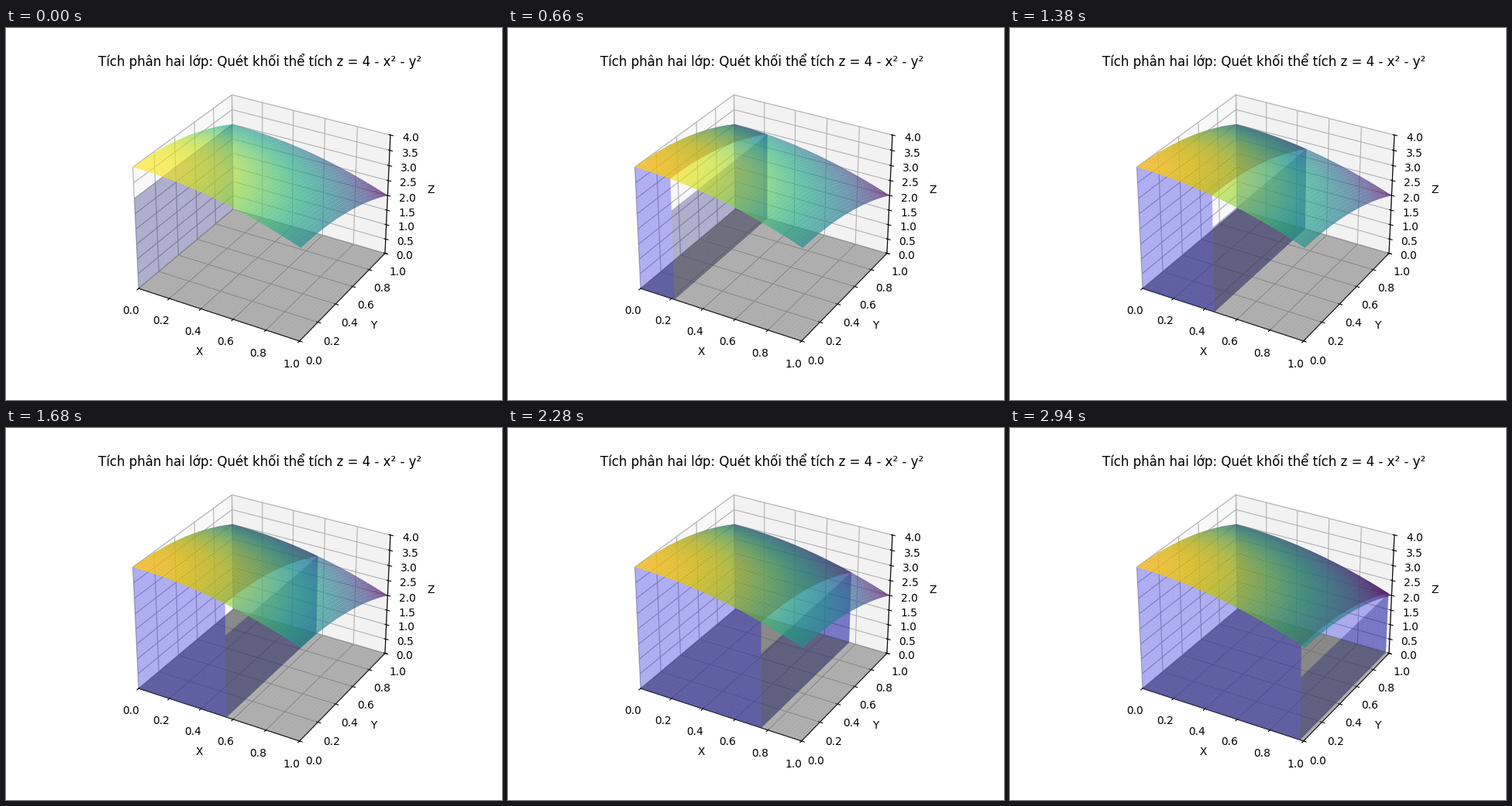
A matplotlib script that plays this animation: 640 by 480 pixels, repeating every 3000 ms.

```python
import numpy as np
import matplotlib.pyplot as plt
from matplotlib.animation import FuncAnimation
from mpl_toolkits.mplot3d.art3d import Poly3DCollection

FRAMES = 50
INTERVAL = 60

fig = plt.figure(figsize=(6.4, 4.8), dpi=100)
ax = fig.add_subplot(projection="3d")
ax.set(xlim=(0, 1), ylim=(0, 1), zlim=(0, 4),
       xlabel="X", ylabel="Y", zlabel="Z")
ax.set_title("Tích phân hai lớp: Quét khối thể tích z = 4 - x² - y²")


def height(x, y):
    return 4 - x**2 - y**2


def quads(x, y, z):
    """Split a grid into four-cornered faces."""
    p = np.stack(np.broadcast_arrays(x, y, z), axis=-1)
    corners = [p[:-1, :-1], p[:-1, 1:], p[1:, 1:], p[1:, :-1]]
    return np.stack(corners, axis=2).reshape(-1, 4, 3)


def add_solid(x, y, z, color, alpha):
    faces = Poly3DCollection(quads(x, y, z), facecolors=color,
                             shade=True, alpha=alpha)
    ax.add_collection(faces, autolim=False)
    return faces


def add_mapped(x, y, z, cmap, alpha):
    faces = quads(x, y, z)
    surf = Poly3DCollection(faces, cmap=cmap, alpha=alpha)
    surf.set_array(faces[:, :, 2].mean(axis=1))
    ax.add_collection(surf, autolim=False)
    return surf


# The whole surface and the floor stay in place
grid = np.linspace(0, 1, 50)
X, Y = np.meshgrid(grid, grid)
add_mapped(X, Y, height(X, Y), "viridis", 0.7)
add_solid(X, Y, 0.0, "gray", 0.5)

unit = np.linspace(0, 1, 30)
U, V = np.meshgrid(unit, unit)
swept = []


def update(frame):
    """Fill the volume from x = 0 up to the moving cut."""
    while swept:
        swept.pop().remove()
    cut = frame / FRAMES
    if cut > 0:
        x = U * cut
        swept.append(add_solid(x, V, height(x, V), "red", 0.5))
        swept.append(add_solid(x, V, 0.0, "gray", 0.5))
        for side in (0.0, 1.0):
            swept.append(add_solid(x, side, V * height(x, side), "blue", 0.3))
    swept.append(add_solid(cut, U, V * height(cut, 1), "blue", 0.3))
    return swept


anim = FuncAnimation(fig, update, frames=FRAMES, interval=INTERVAL,
                     repeat=True, repeat_delay=0)
plt.show()
```
